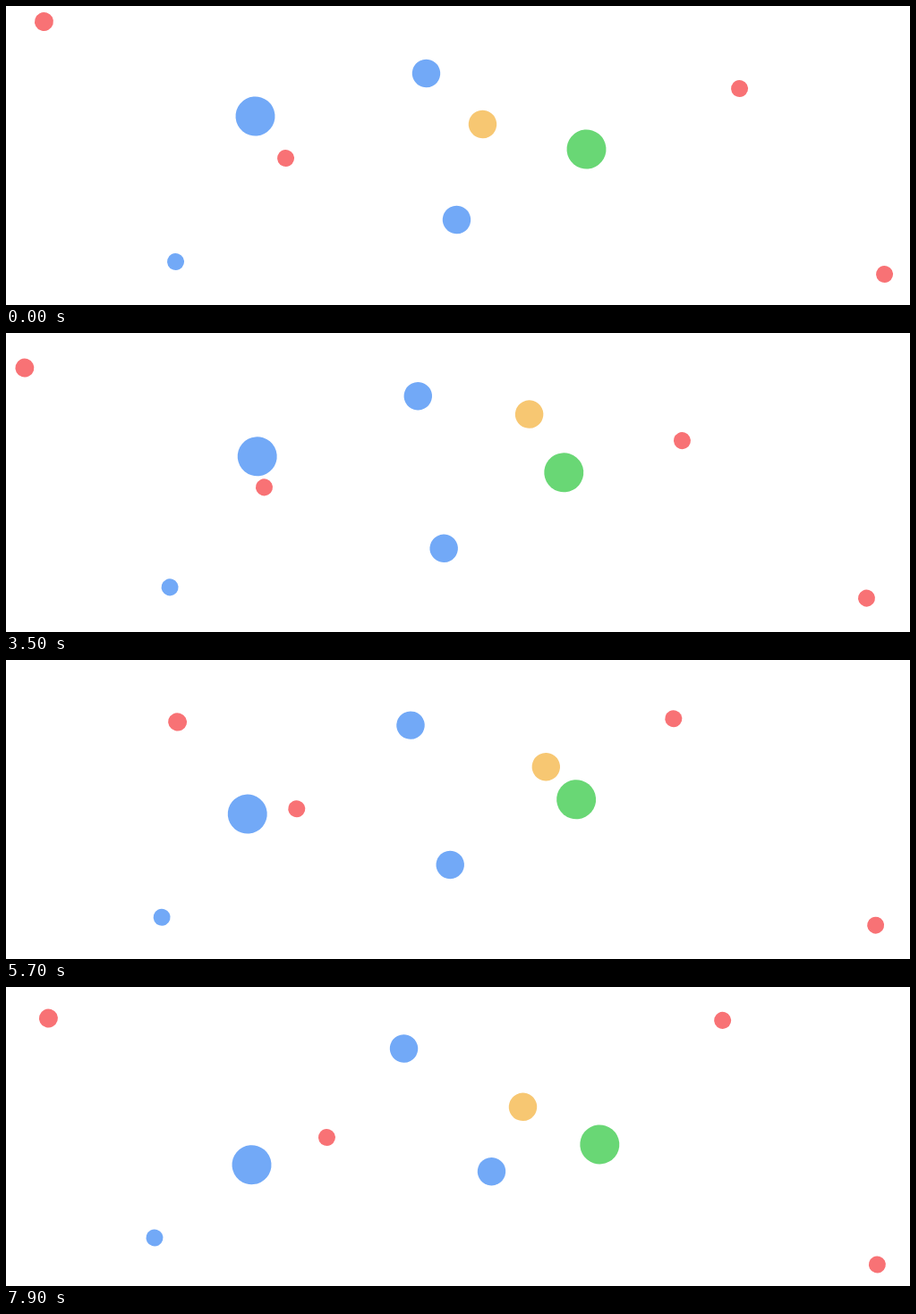
These frames come from a looping animation (1010x335 px, 8000 ms). An HTML page with a canvas:

```html
<!DOCTYPE html>
<html lang="en">
<head>
<meta charset="utf-8">
<title>Drifting dots</title>
<style>
  html, body { margin: 0; width: 100%; height: 100%; overflow: hidden; background: #fff; }
  canvas { display: block; width: 1010px; height: 335px; }
</style>
</head>
<body>
<canvas id="stage"></canvas>
<script>
const W = 1010, H = 335, LOOP = 8, FPS = 10;
const RED = '#f87275', BLUE = '#72a9f7', GREEN = '#69d775', AMBER = '#f7c772';
const BIG = 22, MEDIUM = 15.7, SMALL = 9.5;

// Every dot passes its stops at these seconds, on straight or rounded legs.
const STOPS = [0, 2.5, 5, 6.5, 7.9];
const dot = (r, color, stops, extra) => ({ r, color, stops, ...extra });
const rounded = true;

// "bows" push single legs sideways; "trip" is a fast excursion out and back.
const dots = [
  dot(BIG, BLUE, [[278.5, 123.5], [289.5, 123.5], [267.5, 160.5], [272.3, 186.4], [274.5, 199.2]]),
  dot(BIG, GREEN, [[648.5, 160.5], [623.5, 162.5], [630.5, 148.5], [647, 168.8], [663.3, 176.4]], { rounded }),
  dot(MEDIUM, BLUE, [[469.5, 75.5], [463.5, 67.5], [455.5, 75.5], [448, 70.4], [444.5, 69]]),
  dot(MEDIUM, BLUE, [[503.5, 239.5], [500.3, 245.8], [472.5, 234.5], [523.4, 223.7], [542.5, 206.7]],
    { bows: [[11.5, -49]] }),
  dot(MEDIUM, AMBER, [[532.5, 132.5], [555.8, 90.6], [603, 111], [595.9, 129.2], [577.5, 134.3]],
    { rounded, bows: [[-19, 51], [10, -3]] }),
  dot(SMALL, BLUE, [[189.5, 286.5], [185.5, 280.5], [179.5, 291.5], [168, 284.5], [166, 281]]),
  dot(SMALL, RED, [[312.5, 170.5], [272.5, 174.5], [312.5, 170.5], [338.8, 162.5], [358.4, 168.5]]),
  dot(SMALL, RED, [[819.5, 92.5], [773.5, 134.5], [737.5, 82.5], [765.3, 48.7], [800.6, 37.4]], { rounded }),
  dot(SMALL, RED, [[981.5, 300.5], [953.5, 299.5], [973.5, 293.5], [969.5, 301.4], [973.4, 311]]),
  dot(10.5, RED, [[42.5, 17.5], [42.2, 40.5], [-8, 28], [42.4, 3.5], [47.4, 35]],
    { rounded, bows: [[4.6, -5.6]], trip: [418.5, 127] })
];

const canvas = document.getElementById('stage');
const ctx = canvas.getContext('2d');
const ratio = window.devicePixelRatio || 1;
canvas.width = W * ratio;
canvas.height = H * ratio;
ctx.scale(ratio, ratio);

// Share of the trip covered: a quick start, then a long eased return.
function tripAt(t) {
  const start = 4, rise = 0.8, peak = 5, end = 7.2;
  if (t < start || t > end) return 0;
  const u = Math.min((t - start) / rise, 1);
  return u * u * (3 - 2 * u) * ((end - t) / (end - peak)) ** 2.2;
}

function slope(stops, i, axis) {
  const a = Math.max(i - 1, 0), b = Math.min(i + 1, stops.length - 1);
  return (stops[b][axis] - stops[a][axis]) / (STOPS[b] - STOPS[a]);
}

function position({ stops, rounded, bows = [], trip = [0, 0] }, t, axis) {
  let i = 0;
  while (i < STOPS.length - 2 && t >= STOPS[i + 1]) i++;
  const span = STOPS[i + 1] - STOPS[i];
  const u = (t - STOPS[i]) / span;
  const a = stops[i][axis], d = stops[i + 1][axis] - a;
  let p = a + d * u;
  if (rounded) {
    p += u * (1 - u) * ((1 - u) * (span * slope(stops, i, axis) - d)
      - u * (span * slope(stops, i + 1, axis) - d));
  }
  if (bows[i]) p += bows[i][axis] * Math.sin(Math.PI * u);
  return p + trip[axis] * tripAt(t);
}

function drawDot(dot, t) {
  const squash = dot.trip ? 0.09 * tripAt(t) : 0;
  ctx.beginPath();
  ctx.ellipse(position(dot, t, 0), position(dot, t, 1),
    dot.r, dot.r * (1 - squash), 0.3, 0, Math.PI * 2);
  ctx.fillStyle = dot.color;
  ctx.fill();
}

function render(seconds) {
  const t = Math.floor((seconds % LOOP) * FPS + 1e-6) / FPS;
  ctx.fillStyle = '#fff';
  ctx.fillRect(0, 0, W, H);
  for (const d of dots) drawDot(d, t);
}

let start = null;
function tick(now) {
  if (start === null) start = now;
  render((now - start) / 1000);
  requestAnimationFrame(tick);
}
render(0);
requestAnimationFrame(tick);
</script>
</body>
</html>
```
